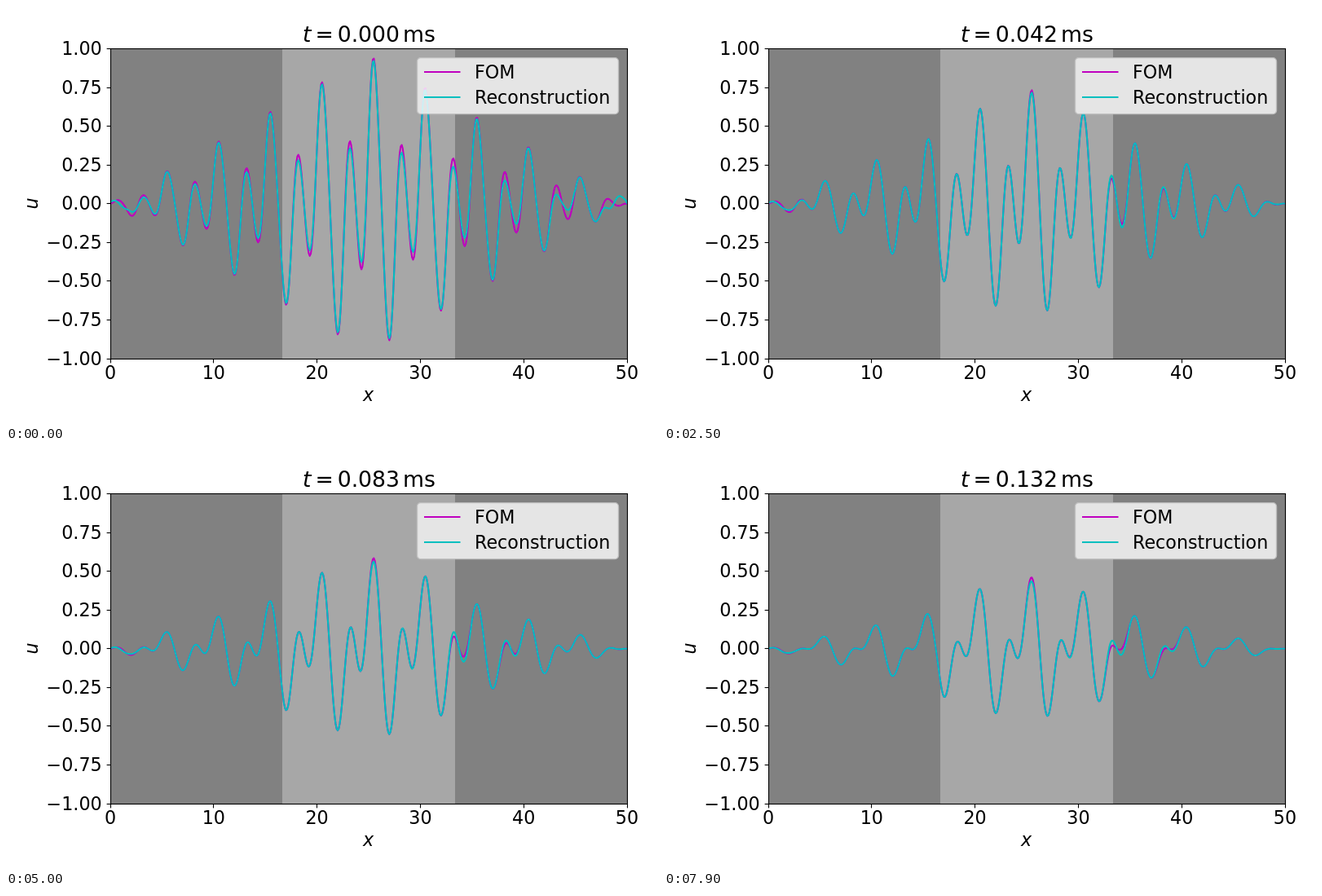
These frames come from a looping animation (800 by 512 pixels, 8000 ms). An HTML page:

```html
<!DOCTYPE html>
<html lang="en">
<head>
<meta charset="utf-8">
<style>
  html, body { margin: 0; width: 100%; height: 100%; overflow: hidden; background: #fff; }
  svg { display: block; width: 800px; height: 512px; font: 22.22px "DejaVu Sans", sans-serif; }
  .title { font-size: 26.67px; }
  .italic { font-style: italic; }
  .curve { fill: none; stroke-width: 2.08; stroke-linejoin: round; }
  .full { stroke: #bf00bf; }
  .recon { stroke: #00bfbf; }
</style>
</head>
<body>
<svg viewBox="0 0 800 512">
  <defs><clipPath id="axes"><rect x="128" y="52" width="634" height="381"/></clipPath></defs>
  <rect x="128" y="52" width="634" height="381" fill="#818181"/>
  <rect x="339" y="52" width="212" height="381" fill="#a7a7a7"/>
  <rect x="504.5" y="63.6" width="247" height="69" rx="4.4" fill="#818181"/>
  <g clip-path="url(#axes)">
    <path id="full" class="curve full"/>
    <path id="recon" class="curve recon"/>
  </g>
  <g id="ticks" stroke="#000" stroke-width="1.1"></g>
  <rect x="128.5" y="52.5" width="634" height="381" fill="none" stroke="#000" stroke-width="1.1"/>
  <g id="labels"></g>
  <g class="title">
    <text x="364" y="44" class="italic">t</text>
    <text x="379.5" y="44">=</text>
    <text id="clock" x="406.7" y="44"></text>
    <text x="487" y="44">ms</text>
  </g>
  <text x="444.5" y="485" text-anchor="middle" class="italic">x</text>
  <text transform="translate(39 242.5) rotate(-90)" text-anchor="middle" class="italic">u</text>
  <rect x="504.5" y="63.6" width="247" height="69" rx="4.4" fill="#fff" stroke="#ccc" stroke-width="1.39" opacity=".8"/>
  <path d="M513 81H557.5" class="curve full"/>
  <path d="M513 112H557.5" class="curve recon"/>
  <text x="575" y="89">FOM</text>
  <text x="575" y="120">Reconstruction</text>
</svg>
<script>
const $ = id => document.getElementById(id);
const px = x => 128 + 12.68 * x;
const py = u => 242.8 - 190.3 * u;
const bell = (x, center, width) => Math.exp(-(((x - center) / width) ** 2));

// Heat diffusion of a few sine modes of period 5 under a triangular envelope
const K = 2 * Math.PI / 5;
const MODES = [0.387, 0.668, -0.046, -0.039];
const CENTER = 1.24;
const INNER_D = 1.22, OUTER_D = 1.77;

function diffused(x, t, D, sharpness) {
  let wave = 0, slope = 0;
  MODES.forEach((amp, i) => {
    const k = K * (i + 1);
    const a = -amp * Math.exp(-D * k * k * t) * (i ? sharpness : 1);
    wave += a * Math.sin(k * (x - CENTER));
    slope += a * k * Math.cos(k * (x - CENTER));
  });
  const s = x - 25;
  const r = Math.sqrt(s * s + 4 * D * t / Math.PI + 1e-9);
  const edge = Math.min(1, x / 1.5, (50 - x) / 1.5);
  return (1 - r / 25) * wave - 2 * D * t * s / (25 * r) * slope * edge;
}

function field(x, t, sharpness = 1) {
  const inner = 1 / (1 + Math.exp((Math.abs(x - 25) - 25 / 3) / 0.2));
  return inner * diffused(x, t, INNER_D, sharpness)
    + (1 - inner) * diffused(x, t, OUTER_D, sharpness);
}

// The reduced model starts too smooth and later lags near the right interface
function reconstruction(x, t) {
  const early = Math.exp(-t / 0.012);
  const late = 1 - Math.exp(-t / 0.05);
  const s = x % 5 - 3.72;
  const ripple = 3 * s * bell(s, 0, 0.75);
  const rippleSize = 0.0013 * x * early - 0.045 * late * bell(x, 35, 4);
  const leftEdge = 0.03 * Math.exp(-t / 0.06) * Math.cos(3 * x) * bell(x, 1.5, 1.5);
  const peak = -0.027 * late * bell(x, 25.5, 0.5);
  return field(x, t, 1 - 0.025 * early) + ripple * rippleSize + leftEdge + peak;
}

function curve(u) {
  let d = "";
  for (let i = 0; i <= 500; i++) {
    const x = i / 10;
    d += (i ? "L" : "M") + px(x).toFixed(2) + " " + py(u(x)).toFixed(2);
  }
  return d;
}

function draw(step) {
  const t = step / 600;
  $("full").setAttribute("d", curve(x => field(x, t)));
  $("recon").setAttribute("d", curve(x => reconstruction(x, t)));
  $("clock").textContent = t.toFixed(3);
}

function buildAxes() {
  let ticks = "", labels = "";
  for (let x = 0; x <= 50; x += 10) {
    ticks += `<path d="M${Math.floor(px(x)) + 0.5} 433.5v4.9"/>`;
    labels += `<text x="${px(x)}" y="458" text-anchor="middle">${x}</text>`;
  }
  for (let i = -4; i <= 4; i++) {
    const y = Math.floor(py(i / 4)) + 0.5;
    const sign = i < 0 ? "\u2212" : "";
    ticks += `<path d="M128.5 ${y}h-4.9"/>`;
    labels += `<text x="117.7" y="${y + 7.5}" text-anchor="end">${sign}${Math.abs(i / 4).toFixed(2)}</text>`;
  }
  $("ticks").innerHTML = ticks;
  $("labels").innerHTML = labels;
}

let shown = -1;
function tick() {
  const step = Math.floor(performance.now() % 8000 / 100);
  if (step !== shown) draw(shown = step);
  requestAnimationFrame(tick);
}

buildAxes();
tick();
</script>
</body>
</html>
```
